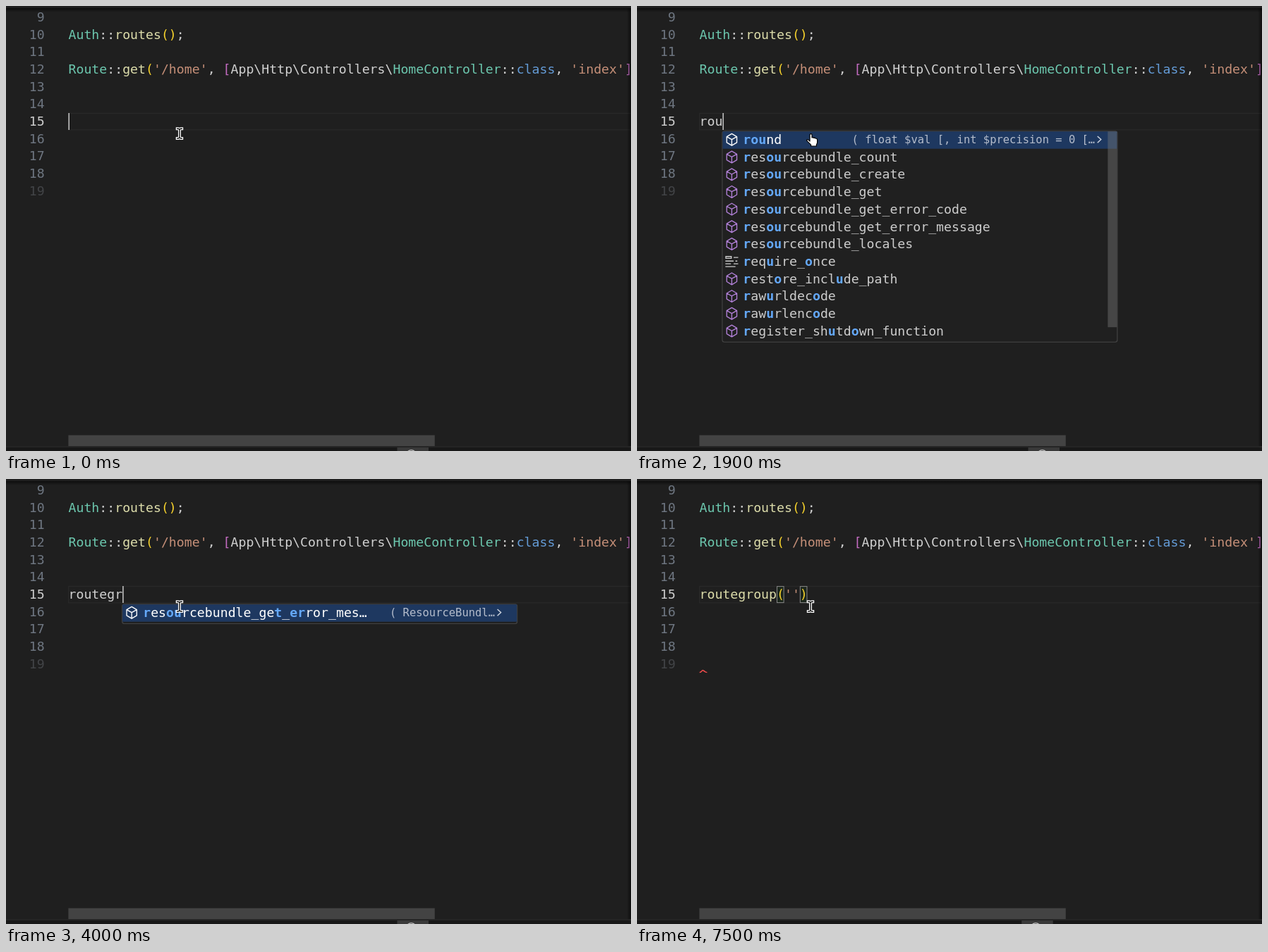
Recreate the animation shown at these times as an HTML page. Size 886 px wide and 632 px high, loop 8 s.

```html
<!DOCTYPE html>
<html lang="en">
<head>
<meta charset="utf-8">
<title>Editor typing</title>
<style>
  html, body { margin: 0; width: 100%; height: 100%; overflow: hidden; background: #1f1f1f; }
  svg { display: block; width: 886px; height: 632px; }
  text { font: 18.2px "DejaVu Sans Mono", monospace; white-space: pre; fill: #ccc; }
  text.detail { font-size: 15.47px; fill: #b4bccb; }
  .hit { font-weight: bold; fill: #64a8f8; }
</style>
</head>
<body>
<svg viewBox="0 0 886 632">
  <defs>
    <linearGradient id="topShade" x2="0" y2="1">
      <stop stop-color="#000" stop-opacity=".55"/><stop offset="1" stop-color="#000" stop-opacity="0"/>
    </linearGradient>
    <linearGradient id="sideShade">
      <stop stop-color="#000" stop-opacity="0"/><stop offset="1" stop-color="#000" stop-opacity=".55"/>
    </linearGradient>
    <path id="cube" fill="none" stroke-width="1.05" stroke-linejoin="round"
      d="M8 1.4 13.5 4.7V11L8 14.3 2.5 11V4.7ZM2.5 4.7 8 7.7 13.5 4.7M8 7.7V14.3"/>
    <path id="keyword" fill="none" stroke-width="1"
      d="M10 3.5h5M1.5 2.5h6v2h-6zM1 7.5h9M12 7.5h2M1 10.5h6M10 10.5h5M1 13.5h11"/>
  </defs>
  <rect width="886" height="632" fill="#1f1f1f"/>
  <rect x="88.7" y="152.4" width="804" height="23.4" fill="none" stroke="#292929" stroke-width="1.3"/>
  <g id="page"></g>
  <rect x="88.4" y="609.5" width="519.4" height="15.6" fill="#434343"/>
  <rect y="3" width="886" height="6" fill="url(#topShade)"/>
  <rect x="880" y="3" width="6" height="622" fill="url(#sideShade)"/>
  <rect y="625.4" width="886" height="7" fill="#181818"/>
  <rect y="625.4" width="886" height="1.3" fill="#2b2b2b"/>
  <g id="status">
    <rect x="554.5" y="627" width="44.5" height="5" fill="#393939"/>
    <path d="M569.5 632.6Q574.5 628.8 579.5 632.6" fill="none" stroke="#c4c4c4" stroke-width="1.3"/>
  </g>
  <g id="live"></g>
  <g id="beam" fill="none" stroke-linejoin="round" stroke-linecap="square">
    <path id="beamPath" d="M242.8 174.3H244.6L246 175.4 247.4 174.3H249.2M246 175.4V186.8M242.8 187.9H244.6L246 186.8 247.4 187.9H249.2" stroke="#fff" stroke-width="4"/>
    <path d="M242.8 174.3H244.6L246 175.4 247.4 174.3H249.2M246 175.4V186.8M242.8 187.9H244.6L246 186.8 247.4 187.9H249.2" stroke="#1a1a1a" stroke-width="1.5"/>
  </g>
  <path id="hand" fill="#fff" stroke="#000" stroke-width="1.2" stroke-linejoin="round"
    d="M245 192V183.2Q245 181.6 246.5 181.6T248 183.2V187Q249.6 186.2 250.6 187.4 252 186.8 253 188 255.6 187.8 255.6 190.2V193.6Q255.6 195.4 254.4 196.8V199H246.6V197.2L241 191.6Q240 190 241.6 189.6 243 189.6 245 192Z"/>
</svg>
<script>
const CHAR = 10.957, LINE = 24.7, LEFT = 88.5, LOOP = 8000;
const $ = id => document.getElementById(id);
const C = { type: '#6cc7ae', fn: '#dcdcaa', str: '#c58f78', plain: '#d0d0d0',
            gold: '#f5d12c', pink: '#c46cc2', key: '#649bd6' };

const col = n => LEFT + n * CHAR;
const baseline = line => Math.round(170 + (line - 15) * LINE);
const span = (s, color) => `<tspan fill="${color}">${s}</tspan>`;
const label = (x, y, body, attr = '') => `<text x="${x}" y="${y}" ${attr}>${body}</text>`;
const rect = (x, y, w, h, attr) => `<rect x="${x}" y="${y}" width="${w}" height="${h}" ${attr}/>`;
const code = (line, parts) =>
  label(LEFT, baseline(line), parts.map(([kind, s]) => span(s, C[kind])).join(''));

function drawPage() {
  let out = '';
  for (let n = 9; n <= 19; n++) {
    const color = n === 15 ? '#ccc' : n === 19 ? '#424447' : '#6e7681';
    out += label(54.6, baseline(n), span(n, color), 'text-anchor="end"');
  }
  out += code(10, [['type', 'Auth'], ['plain', '::'], ['fn', 'routes'], ['gold', '()'], ['plain', ';']]);
  out += code(12, [['type', 'Route'], ['plain', '::'], ['fn', 'get'], ['gold', '('],
    ['str', "'/home'"], ['plain', ', '], ['pink', '['], ['plain', String.raw`App\Http\Controllers` + '\\'],
    ['type', 'HomeController'], ['plain', '::'], ['key', 'class'], ['plain', ', '],
    ['str', "'index'"], ['pink', ']']]);
  $('page').innerHTML = out;
}

// Suggestion lists; capitals mark the matched letters.
const roundHint = '( float $val [, int $precision = 0 […';
const lists = {
  r: { hint: '( float $number ): float', bar: 97,
    rows: 'Rad2deg Rand Random_bytes Random_int Range Rawurldecode Rawurlencode Read_exif_data Readdir Readfile Readgzfile Readlink' },
  ro: { hint: roundHint, more: true, bar: 190,
    rows: 'ROund Require_Once RandOm_bytes RandOm_int ResOurcebundle_count ResOurcebundle_create ResOurcebundle_get ResOurcebundle_locales RestOre_include_path RawurldecOde RawurlencOde Register_shutdOwn_function' },
  rou: { hint: roundHint, more: true, bar: 278,
    rows: 'ROUnd ResOUrcebundle_count ResOUrcebundle_create ResOUrcebundle_get ResOUrcebundle_get_error_code ResOUrcebundle_get_error_message ResOUrcebundle_locales ReqUire_Once RestOre_inclUde_path RawUrldecOde RawUrlencOde Register_shUtdOwn_function' },
  route: { hint: '( ResourceBundle …', more: true,
    rows: 'ResOUrcebundle_geT_Error_c… ResOUrcebundle_geT_Error_message ResOUrcebundle_gET ResOUrcebundle_creaTE ResOUrcEbundle_counT RestOre_inclUdE_paTh' },
  routeg: { hint: '( ResourceBundl…', more: true, rows: 'ResOUrcebundle_geT_Error_mes…' },
  routegr: { hint: '( ResourceBundl…', more: true, rows: 'ResOUrcebundle_geT_ERror_mes…' }
};

const marked = s => s.replace(/[A-Z]+/g, m => `<tspan class="hit">${m.toLowerCase()}</tspan>`);

function popup(text) {
  const { hint, more, bar, rows } = lists[text];
  const names = rows.split(' '), x = col(text.length) - 1, top = 177.8;
  let out = rect(x + .5, top, 560, names.length * LINE + 3, 'rx="3" fill="#202020" stroke="#454545" stroke-width="1.1"');
  out += rect(x + 1, top + .4, 559, 24.5, 'fill="#1e3860"');
  names.forEach((name, i) => {
    const y = top + i * LINE, plain = name.startsWith('Req');
    const color = i === 0 ? '#fff' : plain ? '#ccc' : '#b180d7';
    out += `<use href="#${plain ? 'keyword' : 'cube'}" stroke="${color}" transform="translate(${x + 3.6} ${y + 1.8}) scale(1.3)"/>`;
    out += label(x + 30, Math.round(196 + i * LINE), marked(name), i ? '' : 'style="fill:#fff"');
  });
  out += label(x + (more ? 528.8 : 547.2), 195, hint, 'class="detail" text-anchor="end"');
  if (more) out += `<path d="M${x + 532.4} 185l5 4.6-5 4.6" fill="none" stroke="#d0d6e0" stroke-width="1.4"/>`;
  if (bar) out += rect(x + 547, top + .4, 13, bar, 'fill="#797979" fill-opacity=".42"');
  return out;
}

function typed(text, colored) {
  const [, name, open, quotes, close] = text.match(/^(\w*)(\(?)('*)(\)?)$/);
  let out = '';
  if (open) {
    for (const n of [name.length, text.length - 1])
      out += rect(col(n) + .4, 152.6, 9.6, 23, 'fill="#006400" fill-opacity=".1" stroke="#888" stroke-width="1"');
  }
  return out + code(15, [[colored ? 'fn' : 'plain', name], ['gold', open], ['str', quotes], ['gold', close]]);
}

// time, text, caret column (-1 hides it)
const steps = [
  [0, '', 0], [500, '', -1], [900, 'r', 1], [1200, 'ro', 2], [1600, 'ro', -1],
  [1900, 'rou', 3], [2300, 'route', 5], [2800, 'route', -1], [3400, 'routeg', 6],
  [3700, 'routegr', 7], [4100, 'routegro', 8], [4400, 'routegrou', 9],
  [4900, 'routegroup', 10], [5400, 'routegroup', -1], [5900, 'routegroup', 10],
  [6000, 'routegroup()', 11], [6500, 'routegroup()', -1],
  [7000, "routegroup('')", 12], [7500, "routegroup('')", -1]
];

let last = '';
function render(t) {
  const [, text, caret] = steps.findLast(s => s[0] <= t);
  const checked = t >= 6100, hand = t >= 900 && t < 4000;
  const key = [text, caret, checked, hand, t >= 4400].join();
  if (key === last) return;
  last = key;
  let out = typed(text, checked);
  if (caret >= 0) out += rect(col(caret), 152, 1.5, 24, 'fill="#c8c8c8"');
  if (lists[text]) out += popup(text);
  if (checked) out += '<path d="M88.6 274.6Q90.4 274.6 91.6 273T94 272 96.4 273.6 99.4 274.6" fill="none" stroke="#f14c4c" stroke-width="1.4"/>';
  $('live').innerHTML = out;
  $('hand').style.display = hand ? '' : 'none';
  $('beam').style.display = hand ? 'none' : '';
  $('status').setAttribute('transform', `translate(${t >= 4400 ? -9.3 : 0} 0)`);
}

drawPage();
render(0);
const start = performance.now();
(function tick() {
  render((performance.now() - start) % LOOP);
  requestAnimationFrame(tick);
})();
</script>
</body>
</html>
```
